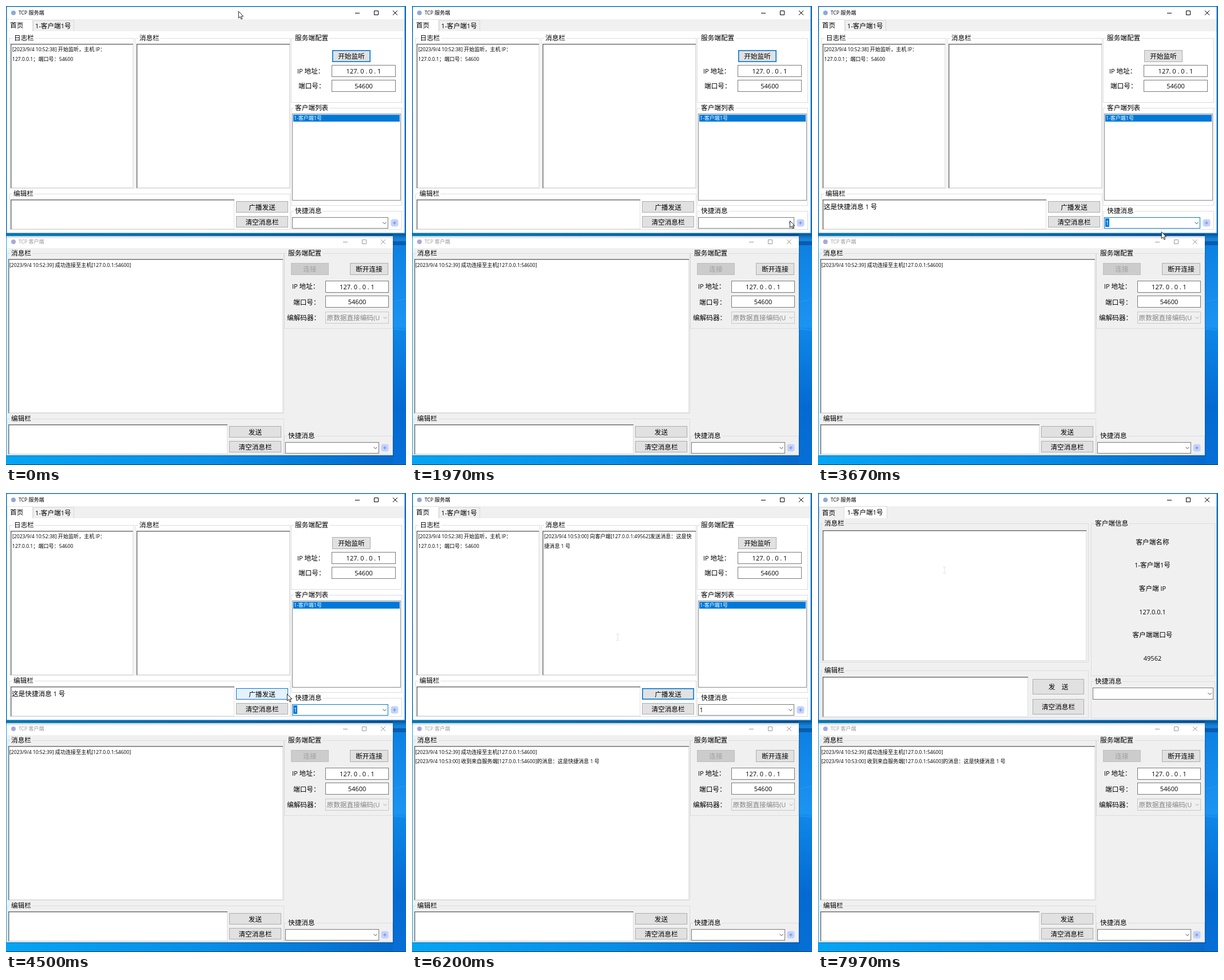
These frames come from a looping animation (699x802 px, 8 s). An HTML page:

```html
<!DOCTYPE html>
<html lang="zh-CN">
<head>
<meta charset="utf-8">
<style>
html, body { margin: 0; width: 100%; height: 100%; overflow: hidden; background: #0a72d6; }
svg { position: absolute; left: 0; top: 0; display: block; }
text { white-space: pre; font-family: "Open Sans", "Noto Sans CJK SC", "Noto Sans CJK", sans-serif; }
</style>
</head>
<body>
<svg width="699" height="802" viewBox="0 0 699 802">
  <defs>
    <linearGradient id="sky"><stop stop-color="#05a5f4"/><stop offset=".5" stop-color="#078fe8"/><stop offset="1" stop-color="#0468cc"/></linearGradient>
    <linearGradient id="side" x2="0" y2="1"><stop stop-color="#0a7ee0"/><stop offset=".4" stop-color="#1c94f2"/><stop offset=".42" stop-color="#0e86e8"/><stop offset=".75" stop-color="#046ad2"/><stop offset="1" stop-color="#066fd6"/></linearGradient>
    <linearGradient id="shade" x2="0" y2="1"><stop stop-opacity=".32"/><stop offset="1" stop-opacity="0"/></linearGradient>
  </defs>
  <g id="scene"></g>
  <path id="arrow" d="M.4 .4V12.2L3.1 9.7L5 14L6.9 13.2L5 9H8.7Z" fill="#fff" stroke="#000" stroke-width=".85"/>
  <path id="beam" d="M-2.5 -5.5H-.5L0 -5L.5 -5.5H2.5M0 -5V5M-2.5 5.5H-.5L0 5L.5 5.5H2.5" fill="none" stroke="#d8d8d8" stroke-width=".8"/>
</svg>
<script>
const BIG = 11.65, SMALL = 9.1, BLUE = '#0078d7', GREY = '#f0f0f0';
const LOOP = 8000;

// Latin runs are set a little smaller than the Chinese around them.
const runs = s => s.replace(/[\x20-\x7e]+/g, m => `<tspan font-size=".945em">${m}</tspan>`);
const text = (x, cy, s, { size = BIG, fill = '#000', anchor = 'start' } = {}) =>
  `<text x="${x}" y="${cy + size * .37}" font-size="${size}" fill="${fill}" text-anchor="${anchor}">${runs(s)}</text>`;
const small = (x, cy, s, fill) => text(x, cy, s, { size: SMALL, fill });
const mid = (x, cy, s, fill) => text(x, cy, s, { fill, anchor: 'middle' });

const fillBox = (l, t, r, b, fill) => `<rect x="${l}" y="${t}" width="${r - l}" height="${b - t}" fill="${fill}"/>`;
const box = (l, t, r, b, fill, stroke, w = 1) =>
  `<rect x="${l + w / 2}" y="${t + w / 2}" width="${r - l - w}" height="${b - t - w}" fill="${fill}" stroke="${stroke}" stroke-width="${w}"/>`;
const line = (d, stroke, w = 1) => `<path d="${d}" fill="none" stroke="${stroke}" stroke-width="${w}"/>`;

const group = (l, t, r, b, title, tx, bg) =>
  box(l, t, r, b, 'none', '#dcdcdc') +
  fillBox(tx - 2, t - 1, tx + title.length * BIG + 2, t + 2, bg) + text(tx, t, title);

const sunken = (l, t, r, b) =>
  box(l, t, r, b, '#fff', '#e0e0e0') +
  line(`M${l + .75} ${b}V${t + .75}H${r}`, '#707070', 1.5);

const buttonLooks = {
  normal: ['#e1e1e1', '#adadad', 1], focus: ['#e1e1e1', BLUE, 1.6], hover: ['#e5f1fb', BLUE, 1],
  pressed: ['#cce4f7', '#005499', 1], disabled: ['#cccccc', '#bfbfbf', 1]
};
const button = (l, t, r, b, label, look = 'normal') =>
  box(l, t, r, b, ...buttonLooks[look]) +
  mid((l + r) / 2, (t + b) / 2 + .5, label, look === 'disabled' ? '#a0a0a0' : '#000');

const field = (l, t, r, b, value) => box(l, t, r, b, '#fff', '#7a7a7a') + mid((l + r) / 2, (t + b) / 2, value);

const combo = (l, t, r, b, { look = 'normal', value = '', selected = false } = {}) => {
  const off = look === 'disabled', active = look === 'open' || look === 'focus' || look === 'hover';
  const cx = r - 6.5, cy = (t + b) / 2;
  let s = box(l, t, r, b, off ? GREY : '#fff', off ? '#c8c8c8' : active ? BLUE : '#7a7a7a');
  if (look === 'open') s += box(r - 13, t, r, b, '#cce4f7', BLUE);
  s += line(`M${cx - 3} ${cy - 1.3}l3 3l3 -3`, off ? '#a8a8a8' : '#444');
  if (selected) s += fillBox(l + 2, t + 2, l + 9, b - 3, BLUE);
  return s + text(l + 2.5, cy, value, { fill: selected ? '#fff' : off ? '#858585' : '#000' });
};

const plus = (x, y) =>
  `<rect x="${x - 6.5}" y="${y - 6.5}" width="13" height="13" rx="4" fill="#c4d3fa"/>` +
  line(`M${x - 3} ${y}h6M${x} ${y - 3}v6`, '#6687e8', 1.1);

const titleBar = (y, title, x, color, dot) =>
  `<circle cx="13" cy="${y}" r="4" fill="${dot}"/>` + small(22, y, title, color) +
  line(`M${x} ${y + .5}h8M${x + 33.5} ${y - 3.5}h7v7h-7zM${x + 66} ${y - 4}l8 8m0 -8l-8 8`, color);

function homePage(s) {
  const W = '#fff';
  return fillBox(1, 44, 697, 397, W) +
    group(6, 56, 224, 319, '日志栏', 14, W) + sunken(8, 66, 222, 318) +
    small(11, 76, '[2023/9/4 10:52:38] 开始监听，主机 IP：') + small(11, 93, '127.0.0.1；端口号：54600') +
    group(226, 56, 497, 319, '消息栏', 233, W) + sunken(228, 66, 496, 318) +
    (s.sent ? small(231, 76, '[2023/9/4 10:53:00] 向客户端[127.0.0.1:49562]发送消息：这是快') + small(231, 93, '捷消息 1 号') : '') +
    group(498, 56, 692, 169, '服务端配置', 505, W) +
    button(570, 77, 637, 98, '开始监听', s.opened ? 'normal' : 'focus') +
    text(509, 114, 'IP 地址：') + field(569, 103, 681, 124, '127. 0 . 0 . 1') +
    text(511, 139.5, '端口号：') + field(569, 129, 681, 150, '54600') +
    group(498, 178, 692, 349, '客户端列表', 505, W) + box(500, 188, 690, 340, W, '#828790') +
    fillBox(502, 190, 688, 202, BLUE) + text(503, 196, '1-客户端1号', { size: SMALL, fill: W }) +
    group(6, 328, 497, 391, '编辑栏', 13, W) + sunken(8, 338, 399, 390) +
    (s.chosen && !s.sent ? text(10, 351, '这是快捷消息 1 号') : '') +
    button(402, 341, 493, 361, '广播发送', s.send) + button(402, 367, 493, 387, '清空消息栏') +
    group(498, 358, 692, 391, '快捷消息', 505, W) +
    combo(500, 369, 668, 389, { look: s.combo, value: s.chosen ? '1' : '', selected: s.chosen && !s.sent }) +
    plus(679, 379);
}

function clientPage() {
  const rows = ['客户端名称', '1-客户端1号', '客户端 IP', '127.0.0.1', '客户端端口号', '49562'];
  return fillBox(1, 44, 697, 397, GREY) +
    group(5, 53, 473, 296, '消息栏', 11, GREY) + sunken(8, 65, 469, 293) +
    group(5, 310, 473, 393, '编辑栏', 11, GREY) + sunken(8, 321, 367, 391) +
    button(375, 325, 465, 352, '发    送') + button(375, 360, 465, 387, '清空消息栏') +
    group(477, 53, 694, 320, '客户端信息', 484, GREY) +
    rows.map((r, i) => mid(584.5, 85.5 + i * 40.6, r)).join('') +
    group(477, 329, 694, 394, '快捷消息', 484, GREY) + combo(480, 340, 691, 361);
}

const serverTabs = s => s.switched
  ? box(2, 25, 46, 45, GREY, '#d9d9d9') + text(7, 35, '首页') +
    box(45, 23, 121, 46, '#fff', '#d9d9d9') + text(51, 34, '1-客户端1号')
  : box(47, 25, 119, 45, s.tabHover ? '#d8eaf9' : GREY, '#d9d9d9') + text(51, 35, '1-客户端1号') +
    box(1, 23, 47, 46, '#fff', '#e2e2e2') + text(7, 34, '首页');

const serverWindow = s =>
  fillBox(0, 0, 698, 398, GREY) + fillBox(1, 1, 697, 23, '#fff') +
  titleBar(12, 'TCP 服务端', 610, '#000', '#8ea9d6') +
  serverTabs(s) + (s.switched ? clientPage() : homePage(s)) +
  box(0, 0, 698, 398, 'none', '#1173bd', 1.5);

const clientWindow = s =>
  fillBox(1, 402, 676, 785, GREY) + fillBox(1, 402, 676, 423, '#fff') +
  titleBar(412, 'TCP 客户端', 589, '#999', '#a9a6e0') +
  group(2, 432, 486, 712, '消息栏', 9, GREY) + sunken(4, 442, 484, 711) +
  small(6, 452.5, '[2023/9/4 10:52:39] 成功连接至主机[127.0.0.1:54600]') +
  (s.sent ? small(6, 469, '[2023/9/4 10:53:00] 收到来自服务端[127.0.0.1:54600]的消息：这是快捷消息 1 号') : '') +
  group(2, 721, 486, 784, '编辑栏', 9, GREY) + sunken(4, 731, 387, 783) +
  button(390, 734, 481, 754, '发送') + button(390, 760, 481, 780, '清空消息栏') +
  group(486, 432, 676, 564, '服务端配置', 493, GREY) +
  button(498, 449, 564, 470, '连接', 'disabled') + button(601, 449, 668, 470, '断开连接') +
  text(500, 490, 'IP 地址：') + field(558, 480, 669, 501, '127. 0 . 0 . 1') +
  text(502, 517.5, '端口号：') + field(558, 506, 669, 527, '54600') +
  text(491, 545, '编解码器：') + combo(558, 534, 669, 555, { look: 'disabled', value: '原数据直接编码(U' }) +
  group(486, 751, 676, 784, '快捷消息', 493, GREY) + combo(488, 762, 652, 782) + plus(662, 772);

const dropdown = s => s.combo !== 'open' ? '' :
  fillBox(503, 392, 670, 423, 'rgba(0,0,0,.3)') + box(500, 389, 668, 421, '#fff', BLUE) +
  (s.itemHover ? fillBox(501, 390, 667, 405, BLUE) : '') +
  text(502.5, 398, '1', { fill: s.itemHover ? '#fff' : '#000' }) + text(502.5, 413.5, '2');

const scene = s =>
  fillBox(0, 0, 699, 802, 'url(#sky)') + fillBox(676, 398, 699, 802, 'url(#side)') +
  fillBox(512, 402, 699, 412, '#1583dc') + fillBox(676, 411, 699, 418, '#0a5cae') +
  line('M676 517L699 512M676 564L699 567', '#2b9cf2', .8) +
  fillBox(676, 404, 678, 787, 'rgba(0,0,0,.1)') + fillBox(2, 785, 678, 787, 'rgba(0,0,0,.12)') +
  fillBox(0, 801, 699, 802, '#123e66') +
  clientWindow(s) + fillBox(0, 398, 699, 407, 'url(#shade)') + serverWindow(s) + dropdown(s);

// Pointer stops: time, x, y
const stops = [
  [900, 406, 9], [1900, 660, 375], [2500, 660, 375], [2870, 658, 386], [3250, 602, 395], [3600, 602, 395],
  [4460, 491, 351], [4540, 491, 351], [4800, 482, 349], [5800, 482, 349], [6880, 89, 37], [7520, 89, 37], [7950, 221, 135]
];

function pointerAt(t) {
  const next = stops.findIndex(p => p[0] > t);
  if (next === 0) return stops[0].slice(1);
  if (next < 0) return stops[stops.length - 1].slice(1);
  const [t0, x0, y0] = stops[next - 1], [t1, x1, y1] = stops[next];
  const u = (t - t0) / (t1 - t0), k = u * u * (3 - 2 * u);
  return [x0 + (x1 - x0) * k, y0 + (y1 - y0) * k];
}

const inside = (x, y, [l, t, r, b]) => x > l && x < r && y > t && y < b;
const homeInputs = [[8, 66, 222, 318], [228, 66, 496, 318], [8, 338, 399, 390]];
const clientInputs = [[8, 65, 469, 293], [8, 321, 367, 391]];

function stateAt(t, x, y) {
  const opened = t >= 2400, chosen = t >= 3450, sent = t >= 5030;
  const overSend = inside(x, y, [402, 341, 493, 361]);
  return {
    opened, chosen, sent,
    switched: t >= 7200,
    tabHover: inside(x, y, [47, 25, 119, 44]),
    itemHover: t > 3100 && !chosen && y > 389,
    combo: sent ? 'normal' : chosen ? 'focus' : opened ? 'open' : t > 2000 ? 'hover' : 'normal',
    send: t >= 4930 && !sent ? 'pressed' : overSend ? 'hover' : sent ? 'focus' : 'normal'
  };
}

const [sceneNode, arrow, beam] = ['scene', 'arrow', 'beam'].map(id => document.getElementById(id));
let drawn = '';

function render(now) {
  const t = now % LOOP, [x, y] = pointerAt(t), state = stateAt(t, x, y), key = JSON.stringify(state);
  if (key !== drawn) {
    sceneNode.innerHTML = scene(state);
    drawn = key;
  }
  const typing = (state.switched ? clientInputs : homeInputs).some(r => inside(x, y, r));
  for (const node of [arrow, beam]) {
    node.setAttribute('transform', `translate(${x} ${y})`);
    node.style.display = (node === beam) === typing ? '' : 'none';
  }
}

const start = performance.now();
function tick() {
  render(performance.now() - start);
  requestAnimationFrame(tick);
}
tick();
</script>
</body>
</html>
```
